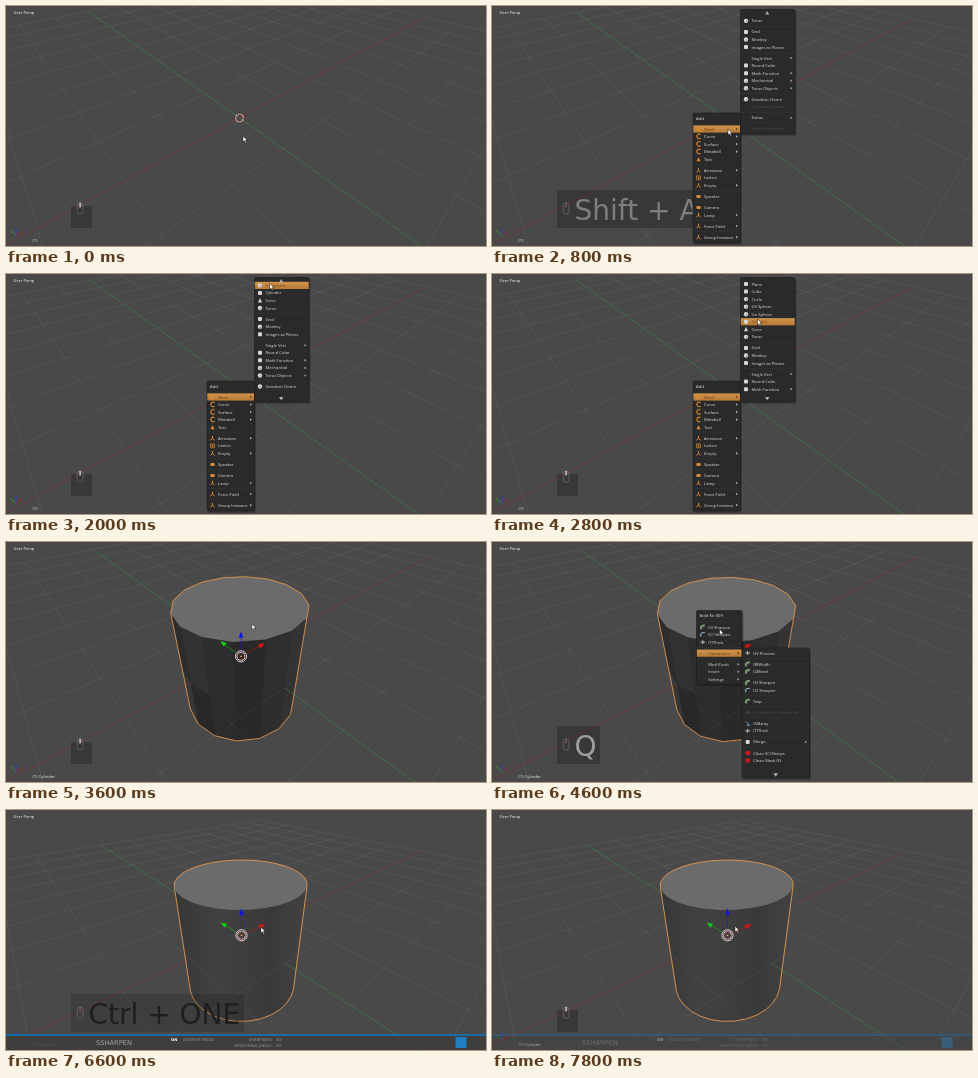
Animation, 480 px wide and 240 px high, one loop 8 s. Source, as an HTML page:

```html
<!DOCTYPE html>
<html lang="en">
<head>
<meta charset="utf-8">
<title>Cylinder sharpen</title>
<style>
html, body { margin: 0; width: 100%; height: 100%; overflow: hidden; background: #494949; }
svg { display: block; width: 100vw; height: 100vh; }
text { font-family: "Open Sans", "Noto Sans", sans-serif; white-space: pre; }
.deja { font-family: "DejaVu Sans", sans-serif; }
</style>
</head>
<body>
<svg id="stage" viewBox="0 0 480 240"></svg>
<script>
const stage = document.getElementById('stage');
const LOOP = 8000, STEP = 200;
const FOCAL = 262, DIST = 4.48, NEAR = 0.3;
const PITCH = 7.55, GAP = 3.5, SCROLL = 48;

// Subdividing doubles the sides and pulls the rim in a little
const COARSE = { sides: 16, radius: 1 };
const FINE = { sides: 32, radius: Math.cos(Math.PI / 16) };

// time, origin x, origin y, elevation, azimuth
const VIEW = [
  [0, 233.5, 112, 39.9, 41.9], [200, 233.5, 112, 39.9, 41.9], [800, 234, 113, 39.7, 41.5],
  [3200, 234, 113, 39.7, 41.5], [3800, 235.5, 115, 39.3, 40.7],
  [5600, 235.5, 115, 39.3, 40.7], [6400, 235.5, 125.3, 32, 40.9]
];
const POINTER = [
  [0, 237, 130], [400, 237, 130], [800, 236, 123], [1000, 254, 118], [1200, 263, 67], [1400, 263, 52],
  [1600, 263, 12], [2200, 264, 8], [2400, 264, 32], [2600, 265, 46], [2800, 265.5, 45],
  [3200, 265.5, 45], [3800, 236, 100], [4200, 232, 108], [4400, 232, 110], [4600, 227.5, 87],
  [4800, 225, 85], [5600, 236, 104], [6400, 255, 117], [6800, 255, 117], [7600, 243, 116]
];
const KEYS = [
  { from: 200, to: 1600, label: 'Shift + A', w: 125 },
  { from: 4200, to: 5400, label: 'Q', w: 22 },
  { from: 5400, to: 6800, label: 'Ctrl + ONE', w: 152 }
];

// Rows: icon, label; "~" dims, ">" adds a submenu arrow, "-" is a gap
const ADD = ['tMesh>', 'aCurve>', 'aSurface>', 'aMetaball>', 'tText', '-', 'yArmature>', 'gLattice',
  'yEmpty>', '-', 'sSpeaker', '-', 'sCamera', 'yLamp>', '-', 'yForce Field>', '-', 'yGroup Instance>'];
const MESH = ['pPlane', 'pCube', 'oCircle', 'oUV Sphere', 'oIco Sphere', 'pCylinder', 'vCone', 'oTorus', '-',
  'pGrid', 'oMonkey', 'pImages as Planes', '-', ' Single Vert>', 'pRound Cube', 'pMath Function>',
  'oMechanical>', 'oTorus Objects>', '-', 'oGeodesic Dome', '~ Discombobulator', '-', ' Extras>', '-',
  '~ Parent To Empty'];
const TOOLS = ['b(S) Sharpen', 'c(C) Sharpen', 'h(T)Thick', '-', ' Operations>', '-', ' MeshTools>', ' Insert>', ' Settings>'];
const OPS = ['hUV Preview', '-', 'b(B)Width', 'b(2)Bevel', '-', 'b(S) Sharpen', 'c(C) Sharpen', '-', 'bStep', '-',
  '~h(C) Slash  (X) Sharpen(s)', '-', 'n(X)Array', 'h(T)Thick', '-', 'pMerge>', '-',
  'rClean SC/Sharps', 'rClean Mask (E)'];

const stroke = (d, c, w = 1) => `<path d="${d}" fill="none" stroke="${c}" stroke-width="${w}"/>`;
const fill = (d, c) => `<path d="${d}" fill="${c}"/>`;
const rect = (x, y, w, h, c, extra = '') => `<rect x="${x}" y="${y}" width="${w}" height="${h}" fill="${c}" ${extra}/>`;
const dot = (x, y, r, c, extra = '') => `<circle cx="${x}" cy="${y}" r="${r}" fill="${c}" ${extra}/>`;
const text = (x, y, s, size, c, extra = '') => `<text x="${x}" y="${y}" font-size="${size}" fill="${c}" ${extra}>${s}</text>`;
const grey = v => { v = Math.round(v); return `rgb(${v},${v},${v})`; };
const poly = pts => 'M' + pts.map(p => p[0].toFixed(2) + ' ' + p[1].toFixed(2)).join('L') + 'Z';
const mix = (a, b, k) => a + (b - a) * k;

const ICONS = {
  t: fill('M-2 2L0 -2L2 2Z', '#dd8a33'),
  a: stroke('M2 -2A2.3 2.3 0 1 0 2 1.7', '#dd8a33', 1.1),
  y: stroke('M0 -2.3V0L-2 2.2M0 0L2 2.2', '#dd8a33', 1),
  g: stroke('M-2 -2H2V2H-2ZM0 -2V2M-2 0H2', '#dd8a33', .6),
  s: rect(-2.2, -1.5, 4.4, 3, '#d98a3a', 'rx="1"'),
  p: rect(-2, -2, 4, 4, '#d6d6d6', 'rx="1"'),
  o: dot(0, 0, 2.2, '#d8d8d8') + dot(.6, .5, .8, '#8a8a8a'),
  v: fill('M-2 2L0 -2.4L2 2Z', '#d6d6d6'),
  b: stroke('M-2 2V0Q-2 -2 2 -2', '#8fce7c', 1.1) + stroke('M-1 2.2V1Q-1 -1 2 -1', '#ddd', .5),
  c: stroke('M-2 2V0Q-2 -2 2 -2', '#8fc0d8', 1.1),
  h: stroke('M-2.4 0H2.4M0 -2V2', '#d8d8d8', .8),
  n: stroke('M-2 -2L2 2M-1 2H2', '#7aa6d8', .9),
  r: rect(-2.3, -2, 4.6, 4, '#d01820', 'rx="1"')
};

// Piecewise-linear value of a keyed track
function track(keys, t) {
  let i = 0;
  while (i < keys.length - 1 && keys[i + 1][0] <= t) i++;
  const a = keys[i], b = keys[i + 1] || a;
  const k = b === a ? 0 : (t - a[0]) / (b[0] - a[0]);
  return a.slice(1).map((v, j) => mix(v, b[j + 1], k));
}

function camera([ox, oy, el, az]) {
  const rad = Math.PI / 180;
  const s = Math.sin(el * rad), c = Math.cos(el * rad);
  const sa = Math.sin(az * rad), ca = Math.cos(az * rad);
  const local = ([x, y, z]) => {
    const away = x * sa + y * ca;
    return [x * ca - y * sa, z * c + away * s, DIST + away * c - z * s];
  };
  const flat = ([r, up, d]) => [
    240 + (FOCAL * r + (ox - 240) * DIST) / d,
    120 + ((oy - 120) * DIST - FOCAL * up) / d
  ];
  return { ox, oy, el, local, point: p => flat(local(p)),
    line(p, q) {
      let a = local(p), b = local(q);
      if (a[2] < NEAR && b[2] < NEAR) return '';
      const k = (NEAR - a[2]) / (b[2] - a[2]);
      const cut = a.map((v, i) => mix(v, b[i], k));
      if (a[2] < NEAR) a = cut; else if (b[2] < NEAR) b = cut;
      return 'M' + [a, b].map(v => flat(v).map(n => n.toFixed(2)).join(' ')).join('L');
    }
  };
}

function hull(pts) {
  const sorted = [...pts].sort((a, b) => a[0] - b[0] || a[1] - b[1]);
  const half = list => {
    const out = [];
    for (const p of list) {
      while (out.length > 1) {
        const [a, b] = out.slice(-2);
        if ((b[0] - a[0]) * (p[1] - a[1]) - (b[1] - a[1]) * (p[0] - a[0]) > 0) break;
        out.pop();
      }
      out.push(p);
    }
    return out.slice(0, -1);
  };
  return [...half(sorted), ...half(sorted.reverse())];
}

function floor(cam) {
  let d = '';
  for (let i = -8; i <= 8; i++) {
    if (!i) continue;
    d += cam.line([i, -8, 0], [i, 8, 0]) + cam.line([-8, i, 0], [8, i, 0]);
  }
  return stroke(d, 'rgba(255,255,255,.09)', .65) +
    stroke(cam.line([-8, 0, 0], [8, 0, 0]), '#71353b', .8) +
    stroke(cam.line([0, -8, 0], [0, 8, 0]), '#3d7841', .8);
}

const rim = (cam, { sides, radius }, z) => Array.from({ length: sides }, (_, i) => {
  const a = i / sides * 2 * Math.PI;
  return cam.point([Math.sin(a) * radius, Math.cos(a) * radius, z]);
});

function side(cam, mesh, z0, z1, smooth) {
  const lo = rim(cam, mesh, z0), hi = rim(cam, mesh, z1);
  const body = fill(poly(hull([...lo, ...hi])), 'url(#body)');
  if (smooth) return body;
  const tones = [[0, 40], [.1, 56], [.2, 40], [.3, 46], [.5, 40], [.75, 46], [1, 54]];
  return body + lo.map((p, i) => {
    const j = (i + 1) % mesh.sides;
    const quad = [p, lo[j], hi[j], hi[i]];
    const facing = (lo[j][0] - p[0]) * (hi[i][1] - p[1]) - (lo[j][1] - p[1]) * (hi[i][0] - p[0]);
    if (facing < 0) return '';
    const u = ((hi[i][0] + hi[j][0]) / 2 - 166) / 138;
    const c = grey(track(tones, Math.max(0, u))[0]);
    return `<path d="${poly(quad)}" fill="${c}" stroke="${c}" stroke-width=".4"/>`;
  }).join('');
}

// Shading across the body, blended between the high and the low view
function bodyGradient(k) {
  const stops = [[0, 57, 54], [.12, 50, 58], [.3, 44, 65], [.5, 43, 62], [.72, 47, 57], [.85, 51, 62], [1, 59, 66]];
  return '<defs><linearGradient id="body" gradientUnits="userSpaceOnUse" x1="166" x2="303" y1="0" y2="0">' +
    stops.map(([o, a, b]) => `<stop offset="${o}" stop-color="${grey(mix(a, b, k))}"/>`).join('') +
    '</linearGradient></defs>';
}

function cursor3d({ ox, oy }) {
  return `<g transform="translate(${ox} ${oy})">` + stroke('M-6 0H-2.5M2.5 0H6M0 -6V-2.5M0 2.5V6', '#222', .6) +
    dot(0, 0, 4, 'none', 'stroke="#eee" stroke-width=".9"') +
    dot(0, 0, 4, 'none', 'stroke="#d0302c" stroke-width=".9" stroke-dasharray="1.57"') + '</g>';
}

function manipulator(cam) {
  const { ox, oy } = cam;
  const arrow = (axis, c) => {
    const [r, up] = cam.local(axis);
    const len = Math.hypot(r, up), nx = up / len * 2.4, ny = r / len * 2.4;
    const at = l => [ox + r * l, oy - up * l];
    const [bx, by] = at(24), tip = at(32), from = at(8);
    return stroke(`M${from}L${[bx, by]}`, c, .5) + fill(poly([[bx + nx, by + ny], tip, [bx - nx, by - ny]]), c);
  };
  return arrow([0, 1, 0], '#10d018') + arrow([1, 0, 0], '#d81414') + arrow([0, 0, 1], '#1414e0') +
    dot(ox, oy, 5.6, 'none', 'stroke="#e8e8e8" stroke-width=".9"') + dot(ox, oy, .9, '#f0a050');
}

function miniAxes(cam) {
  const axis = (v, c) => {
    const [r, up] = cam.local(v);
    return stroke(`M10 229L${10 + r * 9} ${229 - up * 9}`, c, .9);
  };
  return axis([0, 1, 0], '#2f9a35') + axis([1, 0, 0], '#a82c2c') + axis([0, 0, 1], '#2c3fd0');
}

// hot(y, label) tells whether a row is highlighted; lo and hi bound the visible rows
function menu({ x, y, w, h, title, rows, first, tx, hot, lo = 0, hi = 240 }) {
  let out = rect(x + .8, y + 1.2, w + .6, h + .6, '#000', 'opacity=".25" rx="1.5"') +
    rect(x, y, w, h, '#2a2a2a', 'rx="1.5" stroke="#1c1c1c" stroke-width=".6"');
  if (title) out += text(x + 3, y + 6.8, title, 4.2, '#e4e4e4') + stroke(`M${x} ${y + 11}h${w}`, '#383838', .4);
  let cy = first;
  for (const row of rows) {
    if (row === '-') {
      const ly = cy - PITCH / 2 + GAP / 2;
      if (ly > lo && ly < hi) out += stroke(`M${x + 1} ${ly}h${w - 2}`, '#3c3c3c', .4);
      cy += GAP;
      continue;
    }
    const dim = row[0] === '~', sub = row.endsWith('>');
    const body = row.slice(dim ? 1 : 0, sub ? -1 : undefined);
    const label = body.slice(1);
    if (cy > lo && cy < hi) {
      const on = hot(cy, label);
      if (on) out += rect(x + .3, cy - 3.6, w - .6, 7.2, 'url(#hot)');
      const c = on ? '#6b3f12' : dim ? '#4c4c4c' : '#dedede';
      if (ICONS[body[0]]) out += `<g transform="translate(${tx - 5.5} ${cy})" ${dim ? 'opacity=".2"' : ''}>${ICONS[body[0]]}</g>`;
      out += text(tx, cy + 1.5, label, 4.15, c);
      if (sub) out += fill(`M${x + w - 4.5} ${cy - 1.3}l2 1.3l-2 1.3Z`, on ? c : '#a8a8a8');
    }
    cy += PITCH;
  }
  return out;
}

const HOT = '<defs><linearGradient id="hot" x2="0" y2="1"><stop stop-color="#d0944e"/><stop offset="1" stop-color="#b87a35"/></linearGradient></defs>';
const isRow = name => (y, label) => label === name;

function menus(t) {
  let out = '';
  if (t >= 400 && t < 3200) {
    out += menu({ x: 201, y: 107, w: 47.5, h: 130, title: 'Add', rows: ADD, first: 123, tx: 212, hot: isRow('Mesh') });
    if (t >= 800) {
      const off = track([[0, SCROLL], [1600, SCROLL], [2600, 0]], t)[0];
      const py = track(POINTER, t - STEP)[1];
      const up = off > 0, down = off < SCROLL;
      out += menu({ x: 248.5, y: 3.5, w: 54.5, h: 124.5, rows: MESH, first: 10 - off, tx: 259.5,
        hot: y => t >= 1200 && Math.abs(y - py) <= PITCH / 2, lo: up ? 11 : 5, hi: down ? 119 : 126 });
      if (up) out += fill('M273.2 8.5h4l-2 -3.5Z', '#b0b0b0');
      if (down) out += fill('M273 123h4.4l-2.2 3.6Z', '#b0b0b0');
    }
  }
  if (t >= 4200 && t < 4800) {
    out += menu({ x: 204.5, y: 68.5, w: 45.5, h: 73.5, title: 'Bold Kit 009', rows: TOOLS, first: 85, tx: 216.3, hot: isRow('Operations') });
    if (t >= 4400) {
      out += menu({ x: 250, y: 106, w: 67.5, h: 130, rows: OPS, first: 111, tx: 261.2, hot: () => false }) +
        fill('M281.5 231.2h4.4l-2.2 3.6Z', '#b0b0b0');
    }
  }
  return out;
}

function hud(t) {
  if (t < 5000) return '';
  const a = t <= 6600 ? 1 : 1 - .6 * (t - 6600) / 1200;
  const small = (x, y, s, c, extra = '') => text(x, y, s, 3.8, c, 'class="deja" ' + extra);
  return `<g opacity="${a}">` + rect(0, 225, 480, 15, '#3c3c3c', 'opacity=".85"') + rect(0, 224, 480, 2, '#1d6ba3') +
    text(90, 235, 'SSHARPEN', 6.7, '#a2a2a2', 'class="deja"') +
    small(165, 230.9, 'ON', '#fff', 'font-weight="bold"') + small(177, 230.9, 'ADDITIVE MODE', '#949494') +
    small(267, 230.9, 'SHARPNESS:', '#949494', 'text-anchor="end"') + small(270, 230.9, '30°', '#949494') +
    small(267, 237.3, 'SMOOTHING ANGLE:', '#949494', 'text-anchor="end"') + small(270, 237.3, '60°', '#949494') +
    rect(449.5, 227, 11, 11, '#1f7fc0') + '</g>';
}

function keyBox(t) {
  const key = KEYS.find(k => t >= k.from && t < k.to);
  const y = key ? 184 : 200, w = key ? 21 + key.w : 21;
  let out = rect(65, y, w, 222 - y, '#000', `opacity="${key && t - key.from >= 1000 ? .15 : .23}"`);
  out += rect(71.3, 196.8, 5.6, 11.4, 'none', 'rx="2.6" stroke="#707070" stroke-width=".7"') +
    stroke('M74.1 197V201.5', key ? '#86605c' : '#f0f0f0', 1.2);
  if (key) out += text(82.5, 214.3, key.label, 28, grey(222 - .16 * (t - key.from)), 'class="deja"');
  return out;
}

function pointer(t) {
  const [x, y] = track(POINTER, t);
  return `<path transform="translate(${x} ${y})" d="M0 0V6L1.4 4.8L2.4 7L3.4 6.5L2.4 4.4H4.2Z" fill="#fff" stroke="#111" stroke-width=".5"/>`;
}

function draw(t) {
  const cam = camera(track(VIEW, t));
  const solid = t >= 3200, smooth = t >= 4800;
  const mesh = t < 5600 ? COARSE : FINE;
  let out = HOT + bodyGradient((39.3 - cam.el) / 7.3) + rect(0, 0, 480, 240, '#494949');
  if (solid) out += side(cam, mesh, -1, 0, smooth);
  out += floor(cam);
  if (solid) {
    const top = rim(cam, mesh, 1);
    out += side(cam, mesh, 0, 1, smooth) + fill(poly(top), '#6b6b6b') +
      stroke(poly(hull([...top, ...rim(cam, mesh, -1)])), '#e29a50', .9);
  }
  out += cursor3d(cam);
  if (solid) out += manipulator(cam);
  out += miniAxes(cam) + stroke('M471 2L477 8M473.5 2L477 5.5', '#545454', .5) +
    text(7.5, 7.8, 'User Persp', 4.1, '#fff') +
    text(26.5, 236.4, solid ? '(1) Cylinder' : '(1)', 4.3, '#f0f0f0');
  stage.innerHTML = out + hud(t) + keyBox(t) + menus(t) + pointer(t);
}

let shown = -1;
const start = performance.now();
function tick() {
  const t = Math.floor((performance.now() - start) % LOOP / STEP) * STEP;
  if (t !== shown) draw(shown = t);
  requestAnimationFrame(tick);
}
tick();
</script>
</body>
</html>
```
